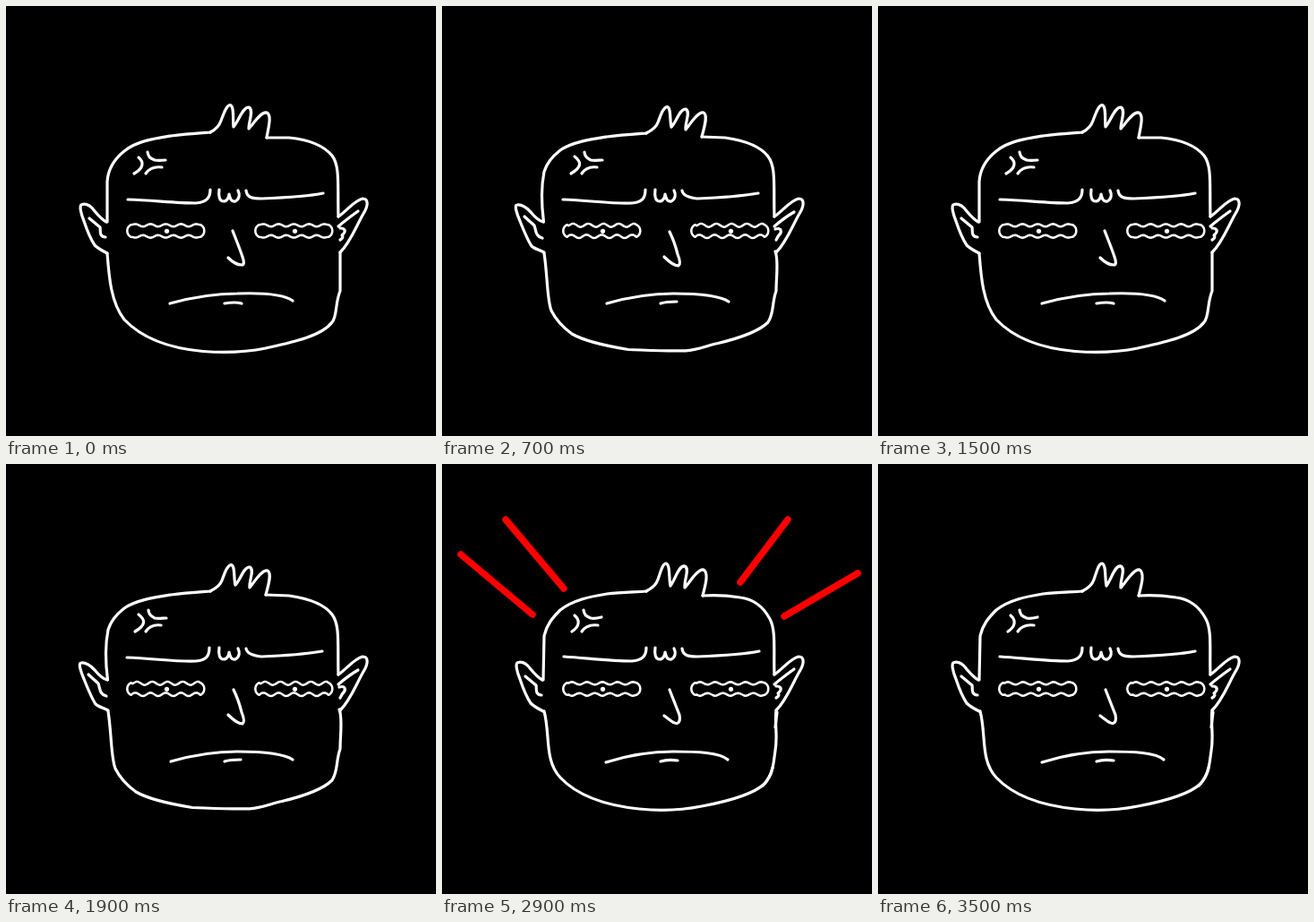
An HTML page that plays this animation: 480 px wide and 480 px high, repeating every 3.6 s.

```html
<!DOCTYPE html>
<html lang="en">
<head>
<meta charset="utf-8">
<title>Angry face</title>
<style>
  html, body { margin: 0; width: 100%; height: 100%; overflow: hidden; background: #000; }
  svg { display: block; width: 100vw; height: 100vh; }
  path { fill: none; stroke: #fff; stroke-width: 3.2; stroke-linecap: round; stroke-linejoin: round; }
  .eye { stroke-width: 2.5; }
  .ray { stroke: #f00; stroke-width: 7.5; }
  circle { fill: #fff; }
</style>
</head>
<body>
<svg viewBox="0 0 480 480"><g id="face"></g><g id="rays"></g></svg>
<script>
const STEP = 100, CYCLE = 18;

// Three hand-drawn variants: later ones redraw only the lines that shift.
const first = {
  crown: 'M113 241V196C114 180 122 170 132 162C145 151 165 148 184 145C200 143 215 142 228 141',
  hair: 'M228 141C234 138 238 134 240 128C243 120 246 111 250 110.5C255 111 253 127 254 135C260 128 264 113 271 113C277 116 271 128 271 137C276 132 284 118 291 119C297 122 293 135 291 147',
  side: 'M291 147H316C336 149 354 155 364 167C373 179 370 200 371 235',
  earR: 'M371 235C380 229 389 217 398 215C405 215 404 223 400 230C391 245 385 263 373 275',
  lobeR: 'M371 246C379 239 386 234 393 229M373 248C379 248 380 252 375 256C377 258 375 260 373 261',
  jaw: 'M373 275V318C367 333 370 346 364 353C352 369 317 376 290 382C265 387 240 387 220 385.5C181 382 151 370 132 350C117 331 115 302 113 276',
  earL: 'M113 276C107 273 102 270 99 267C95 261 90 249 87 240C84 233 81 222 85 221.5C91 220 96 225 99 229C104 235 108 239 112 241',
  lobeL: 'M93 237L105 247C106 250 103 257 111 258',
  browL: 'M136 216C165 217 190 220 212 220C223 219 228 215 228 205',
  browR: 'M268 206C269 214 275 215 285 215C310 214 335 213 354 209',
  frown: 'M238 205C237 212 238 218 243 218C247 218 249 213 249 210C250 214 251 219 256 218C261 215 261 210 259 206',
  anger: 'M148 169C154 174 154 181 143 187M158 163C159 169 161 170 166 172C170 173 174 172 178 172M156 187C160 181 166 179 174 180',
  nose: 'M253 251C257 261 261 271 264 280C266 286 266 289 263 289C259 289 254 287 248 281',
  mouth: 'M183 332C205 326 230 321 258 321C285 320 310 322 320 329',
  lip: 'M244 332C250 331 256 330 263 332'
};
const second = {
  ...first,
  crown: 'M113.500 241C111 222 111 200 114 185C117 175 123 168 132 161C145 152 165 149 184 146C200 144 215 143 228 142',
  hair: 'M228 142C234 139 239 136 241 130C244 122 247 112.5 251.500 112.500C256 114 254 128 256 135C262 129 265 115 272 115C278 118 271 130 272 138C277 132 285 118 292 119C297 122 293 135 290 146',
  side: 'M290 146L316 147C337 150 355 156 364 168C373 180 370 200 371 235',
  lobeR: 'M371 246C379 239 386 234 393 230M372 249C379 247 380 252 376 256C374 258 374 260 373 261',
  jaw: 'M372 274C376 284 373 302 373 318C368 332 371 342 364 353C354 363 331 371 308 376.500C296 379 285 384 272 384.800C250 385.500 225 384 208 383.500C180 379 159 374 145 366C134 358 127 350 122 340C117 327 118 302 114 276',
  earL: 'M114 275C108 272 103 271 100 268C96 262 91 250 87 240C84 233 80 222 84 222C91 221 96 227 99 230C104 236 108 240 113 241',
  lobeL: 'M92 235L103 245C105 250 104 257 112 259',
  browL: 'M135 216C165 217 190 221 212 220C223 219 227 215 227 205',
  browR: 'M268 206C269 212 276 214 285 215C310 214 335 212 353 209',
  anger: 'M148 168C156 174 156 180 144 187M159 163C159 168 162 170 166 172C170 173 175 172 179 172M156 187C160 181 166 179 173 180',
  nose: 'M254 252C258 260 261 269 263 277C265 282 267 288 264 290C260 290 255 287 248 280',
  mouth: 'M184 332C205 326 230 321 258 321C285 321 310 323 320 330',
  lip: 'M244 332C250 330 256 330 262 330'
};
const third = {
  ...first,
  crown: 'M113 241L114 192C117 179 123 172 132 163C146 152 165 148 184 145C200 143 215 143 228 142',
  hair: 'M228 142C234 139 239 135 241 129C244 121 246 111 250 111C255 112 253 128 255 136C261 128 264 113 271 114C277 117 270 129 271 138C276 133 285 117 292 118C298 122 294 135 291 147',
  side: 'M291 147C305 146 320 147 333 149C349 151 359 160 366 173C373 186 370 208 371 235',
  jaw: 'M373 275C371 290 375 303 372 320C370 333 370 346 360 357C347 369 317 377 290 382C265 387 240 387 220 385C181 381 151 370 132 350C114 331 121 302 114 276',
  shade: 'M374 277L372 294M369 339C367 348 364 353 358 359',
  browL: 'M136 215C165 217 190 220 212 220C223 219 228 215 228 205',
  anger: 'M148 169C154 174 154 181 145 187M158 163C159 169 161 170 166 172C170 173 174 172 178 171M156 187C160 181 166 179 174 180',
  nose: 'M254 252L265 280C267 291 261 291 256 287L248 281',
  mouth: 'M183 333C205 326 230 321 258 321C285 321 310 322 319 330',
  lip: 'M244 332C250 330 256 330 263 331'
};

const line = (d, cls = '') => `<path class="${cls}" d="${d}"/>`;

// Long capsule with a rippled rim; each edge has its own phase.
function eye(cx, { top, bottom, depth }) {
  const rim = [];
  const half = (x, shift) => 6.2 + depth * Math.cos((x - shift) * 2 * Math.PI / 17);
  const cap = (side, from) => {
    for (let a = from; a <= from + 150; a += 15) {
      const r = a * Math.PI / 180;
      rim.push([cx + side * 37 + 6 * Math.cos(r), 251 + 7 * Math.sin(r)]);
    }
  };
  for (let x = -37; x <= 37; x += 2) rim.push([cx + x, 251 - half(x, top)]);
  cap(1, -75);
  for (let x = 37; x >= -37; x -= 2) rim.push([cx + x, 251 + half(x, bottom)]);
  cap(-1, 105);
  return line('M' + rim.map(p => p.map(v => v.toFixed(1))).join('L') + 'Z', 'eye');
}

const ripples = [
  { top: 0, bottom: 0, depth: 1.5 },
  { top: 2, bottom: 8.5, depth: 1.9 },
  { top: 0.7, bottom: 0.7, depth: 1.5 }
];
const faces = [first, second, third].map((parts, i) => {
  const eyes = [178, 321].map(x =>
    eye(x + 0.3, ripples[i]) + `<circle cx="${x + 1.5}" cy="251.300" r="2.6"/>`);
  return '<g>' + Object.values(parts).map(d => line(d)).join('') + eyes.join('') + '</g>';
});

// Each ray runs from its outer end to the head.
const rays = [[71, 62, 136, 139], [21, 101, 101, 168], [386, 62, 333, 132], [464, 122, 382, 170]];
const burst = (from, to) => '<g>' + rays.map(([x, y, u, v]) => {
  const at = k => `${x + (u - x) * k} ${y + (v - y) * k}`;
  return line(`M${at(from)}L${at(to)}`, 'ray');
}).join('') + '</g>';
const bursts = [
  { start: 9, end: 11, art: burst(0.5, 1) },
  { start: 11, end: 13, art: burst(0, 1) },
  { start: 13, end: 15, art: burst(-0.07, 0.4) }
];

const faceLayer = document.getElementById('face');
const rayLayer = document.getElementById('rays');
faceLayer.innerHTML = faces.join('');
rayLayer.innerHTML = bursts.map(b => b.art).join('');

const show = (el, on) => { el.style.display = on ? '' : 'none'; };
const begin = performance.now();
function draw(now) {
  const step = Math.floor(Math.max(0, now - begin) / STEP) % CYCLE;
  [...faceLayer.children].forEach((el, i) => show(el, i === step % 3));
  [...rayLayer.children].forEach((el, i) =>
    show(el, step >= bursts[i].start && step < bursts[i].end));
  requestAnimationFrame(draw);
}
draw(begin);
</script>
</body>
</html>
```
